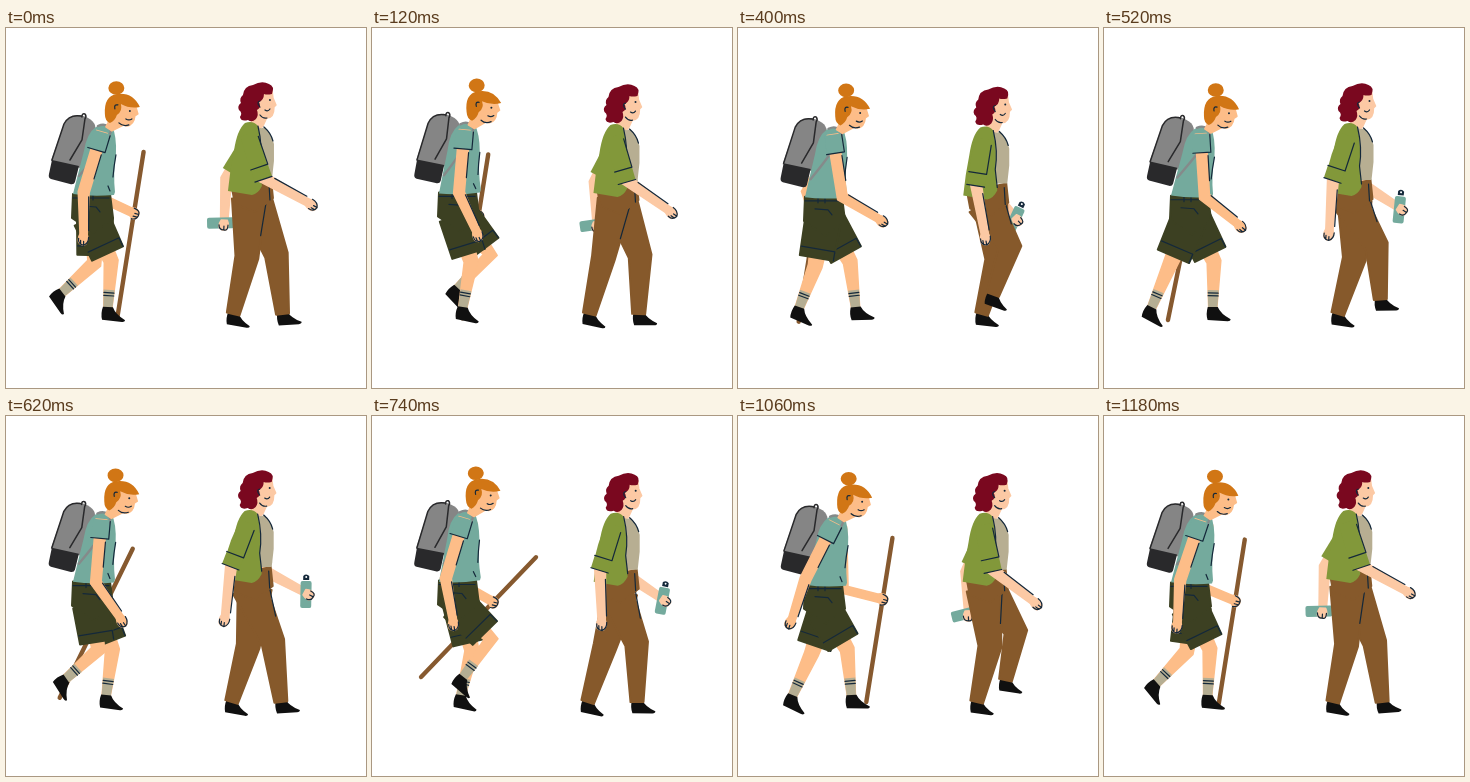
Write an HTML page that moves like this. It is 360 px wide and 360 px high and loops after 1200 ms.

```html
<!DOCTYPE html>
<html lang="en">
<head>
<meta charset="utf-8">
<title>Two walkers</title>
<style>
html, body { margin: 0; width: 100%; height: 100%; overflow: hidden; background: #fff; }
svg { display: block; width: 100vw; height: 100vh; }
path { stroke-linejoin: round; stroke-linecap: round; }
.skin { fill: #fdbd88; stroke: #fdbd88; stroke-width: 1.5; }
.pale { fill: #fcc9a4; stroke: #fcc9a4; stroke-width: 1.5; }
.ink { fill: none; stroke: #14283a; stroke-width: 1.2; }
.teal { fill: #74aa9d; }
.green { fill: #82983a; }
.pants { fill: #86592b; stroke: #86592b; stroke-width: 2; }
.shorts { fill: #3c4022; stroke: #3c4022; stroke-width: 2; }
.shoe { fill: #101010; }
.sock { fill: #b5ae93; }
.stick { fill: none; stroke: #86592f; stroke-width: 4.4; }
.ginger { fill: #d17615; }
.wine { fill: #7a081f; }
.beige { fill: #b7ae92; }
</style>
</head>
<body>
<svg viewBox="0 0 360 360">
  <g id="hiker">
    <path id="hfArm" class="skin"/>
    <path id="stick" class="stick"/>
    <g id="hfHand"><path class="skin" d="M-5-4Q1-7 5-2Q6 4 1 6Q-5 5-5-4Z"/><path class="ink" d="M-1-5Q6-4 5 1Q4 6-1 6M1 0H5M0 3H4"/></g>
    <g id="pack">
      <path fill="#858585" d="M45 133L58 96Q63 87 74 87Q92 92 89 103L74 140Z"/>
      <path fill="#29292b" d="M46 132L73 138L69 154Q68 157 64 156L45 151Q42 150 43 146Z"/>
      <path fill="none" stroke="#29292b" stroke-width="1.5" d="M46 132L58 96Q63 86 75 88M76 89Q76 85 79 86Q81 88 79 91L76 112L64 132"/>
    </g>
    <path id="hfLeg" class="skin"/><path id="hfSock" class="sock"/><path id="hfBand" class="ink"/><path id="hfShoe" class="shoe"/>
    <path id="hfShort" class="shorts"/><path id="hfCuff" class="ink"/>
    <path id="hnLeg" class="skin"/><path id="hnSock" class="sock"/><path id="hnBand" class="ink"/><path id="hnShoe" class="shoe"/>
    <path id="hnShort" class="shorts"/><path id="hnCuff" class="ink"/>
    <g id="waist">
      <path class="shorts" d="M67 166L104 166L107 190L88 205L66 190Z"/>
      <path class="ink" d="M67 170H103M77 178L90 179L94 184M80 167V172M87 167V172"/>
    </g>
    <g id="chest">
      <path class="teal" d="M90 99Q98 95 106 98Q111 108 110 127Q107 145 109 164L108 167Q86 169 67 166Q72 146 78 123Q81 105 90 99Z"/>
      <path fill="none" stroke="#858a8a" stroke-width="2.4" d="M92 98Q101 94 105 103Q103 113 73 148"/>
      <path class="ink" d="M110 127Q108 138 107 149M102 158L104 163"/>
      <path class="skin" d="M100 99L108 84L122 88L118 97L106 103Z"/>
      <path class="skin" d="M112 74L130 79L132 86L129 88Q128 97 121 98Q111 96 109 89Z"/>
      <path class="ginger" d="M99 86Q98 68 111 66Q127 64 134 79Q124 81 115 76Q117 83 111 87Q109 93 104 95Q99 93 99 86Z"/>
      <ellipse class="ginger" cx="110.500" cy="60" rx="8" ry="6.800"/>
      <path class="ink" d="M112 77Q108 76 109 81M120 91Q123 93 126 91M113 95Q117 99 123 97"/>
      <circle cx="124" cy="83" r="1" fill="#14283a"/>
    </g>
    <path id="hnArm" class="skin"/><path id="hnLine" class="ink"/>
    <g id="hnHand"><path class="skin" d="M-4-3Q2-6 7-2Q9 2 5 5Q0 6-4 3Z"/><path class="ink" d="M0-5Q6-5 8 0Q7 6 1 5M4 0L8 0M3 3L7 3"/></g>
    <path id="hSleeve" class="teal"/><path id="hHem" class="ink"/>
  </g>
  <g id="friend">
    <path id="wfArm" class="pale"/><path id="wfSleeve" class="green"/>
    <g id="bottle">
      <rect class="teal" x="-5.500" y="-12" width="11" height="27" rx="2"/>
      <path fill="#14283a" d="M-3-13V-17Q0-20 3-17V-13Z"/><circle cy="-16" r="1" fill="#fff"/>
    </g>
    <g id="wfHand"><path class="pale" d="M-4-3Q2-6 6-2Q7 3 3 5Q-1 5-4 3Z"/><path class="ink" d="M1-4Q7-4 6 0Q6 5 1 5M2 0H6"/></g>
    <path id="wfShoe" class="shoe"/><path id="wfLeg" class="pants"/>
    <path id="wnShoe" class="shoe"/><path id="wnLeg" class="pants"/>
    <path id="crease" class="ink"/>
    <g id="body">
      <path class="pants" d="M226 160L265 151L267 170L249 184L229 176Z"/>
      <path class="ink" d="M263 155L264 172"/>
      <path class="pale" d="M245 96L249 80L262 87L257 98L252 103Z"/>
      <path class="beige" d="M249 97Q254 102 259 99Q266 107 268 116L268 133L266 151H248Z"/>
      <path class="green" d="M239 95Q247 92 252 98Q256 120 254 137L256 158Q252 166 246 167L222 163Q224 142 228 123Q231 102 239 95Z"/>
      <path class="ink" d="M252 98Q257 119 254 137L256 155M258 99Q265 105 267 113"/>
      <path class="pale" d="M251 63L266 62L267 70L270 77L268 79Q268 90 261 90Q252 88 249 80Z"/>
      <path class="wine" d="M247 57Q256 52 263 56Q269 58 266 66Q261 67 258 66Q258 72 253 74Q256 79 251 82Q253 87 250 91Q246 95 242 92Q235 94 234 89Q237 85 233 82Q231 78 235 75Q233 70 237 67Q238 58 247 57Z"/>
      <path class="ink" d="M254 73Q250 74 254 79M259 82Q262 84 264 81M254 87Q257 91 261 90"/>
      <circle cx="264" cy="72" r="1" fill="#14283a"/>
    </g>
    <path id="wnArm" class="pale"/><path id="wnLine" class="ink"/>
    <g id="wnHand"><path class="pale" d="M-4-3Q2-6 7-2Q9 2 5 5Q0 6-4 3Z"/><path class="ink" d="M0-5Q6-5 8 0Q7 6 1 5M4 0L8 0M3 3L7 3"/></g>
    <path id="wSleeve" class="green"/><path id="wCuff" class="green"/><path id="wHem" class="ink"/>
  </g>
</svg>
<script>
const LOOP = 1200, STEP = 20, RAD = Math.PI / 180;
const $ = id => document.getElementById(id);
const draw = (id, d) => $(id).setAttribute('d', d);
const place = (id, p, a = 0, pivot = '') =>
  $(id).setAttribute('transform', `translate(${p[0]} ${p[1]}) rotate(${a} ${pivot})`);
const mix = (a, b, k) => [a[0] + (b[0] - a[0]) * k, a[1] + (b[1] - a[1]) * k];
const shift = (p, n, w) => [p[0] + n[0] * w, p[1] + n[1] * w];
const poly = pts => 'M' + pts.map(p => p.map(v => v.toFixed(2)).join(' ')).join('L');

// Stride runs once per loop, bob once per step
const stride = (t, peak) => Math.cos((t - peak) * 2 * Math.PI / LOOP);
const bob = (t, peak) => stride(2 * t, 2 * peak);
const hang = (p, len, deg) => [p[0] + len * Math.sin(deg * RAD), p[1] + len * Math.cos(deg * RAD)];
const angle = (a, b) => Math.atan2(b[1] - a[1], b[0] - a[0]) / RAD;

// Unit normal on the walking side of a limb
function normal(a, b) {
  const x = b[0] - a[0], y = b[1] - a[1], n = Math.hypot(x, y) || 1;
  return [y / n, -x / n];
}
function limb(pts, widths) {
  const front = [], back = [], last = pts.length - 1;
  pts.forEach((p, i) => {
    const u = normal(pts[Math.max(0, i - 1)], pts[Math.max(1, i)]);
    const v = normal(pts[Math.min(i, last - 1)], pts[Math.min(i + 1, last)]);
    const x = u[0] + v[0], y = u[1] + v[1], m = Math.hypot(x, y) || 1;
    front.push(shift(p, [x / m, y / m], widths[i] / 2));
    back.unshift(shift(p, [x / m, y / m], -widths[i] / 2));
  });
  return poly([...front, ...back]) + 'Z';
}
function edge(a, b, from, to, w) {
  const n = normal(a, b);
  return poly([shift(mix(a, b, from), n, w), shift(mix(a, b, to), n, w)]);
}
function across(a, b, k, w) {
  const n = normal(a, b), p = mix(a, b, k);
  return poly([shift(p, n, w), shift(p, n, -w)]);
}

const SHOE = 'M-5-2L5-2Q8 5 18 10Q18 12 15 12L-5 11Q-7 5-5-2Z';
document.querySelectorAll('.shoe').forEach(s => s.setAttribute('d', SHOE));

const hikerGait = { land: 920, stance: 800, front: 122, back: 47, ground: 281,
  ease: 1.25, lift: 20, skew: .8, push: 26, twist: 70, bend: 28 };
const friendGait = { land: 1170, stance: 790, front: 279, back: 214, ground: 286,
  ease: 1, lift: 22, skew: 2, push: 10, twist: 45, bend: 18 };

// The foot slides back on the ground, then swings forward in an arc
function step(g, t, hip) {
  const s = (t - g.land + 2 * LOOP) % LOOP, reach = g.front - g.back;
  let ankle, turn, bend;
  if (s < g.stance) {
    const u = s / g.stance;
    ankle = [g.front - reach * u ** g.ease, g.ground];
    turn = g.push * u ** 1.5 - 8 * (1 - u) ** 4;
    bend = 12 * Math.sin(Math.PI * (.2 + .8 * u));
  } else {
    const u = (s - g.stance) / (LOOP - g.stance), arc = Math.sin(Math.PI * u);
    ankle = [g.back + reach * u * u * (3 - 2 * u),
      g.ground - g.lift * Math.sin(Math.PI * u ** g.skew)];
    turn = g.push * (1 - u) - 8 * u + g.twist * arc * (1 - u);
    bend = 7 * u + g.bend * arc;
  }
  const knee = shift(mix(hip, ankle, .5), normal(hip, ankle), bend);
  return { knee, ankle, turn };
}

function bareLeg(id, hip, t) {
  const { knee, ankle, turn } = step(hikerGait, t, hip), end = mix(hip, knee, .82);
  draw(id + 'Leg', limb([hip, knee, ankle], [20, 14, 8]));
  draw(id + 'Sock', limb([mix(knee, ankle, .6), ankle], [11, 9]));
  draw(id + 'Band', across(knee, ankle, .66, 5) + across(knee, ankle, .72, 5));
  place(id + 'Shoe', ankle, turn);
  draw(id + 'Short', limb([hip, end], [36, 34]));
  draw(id + 'Cuff', across(hip, end, .76, 17) + edge(hip, end, .76, 1, 17));
}
function pantLeg(id, hip, t) {
  const { knee, ankle, turn } = step(friendGait, t, hip);
  draw(id + 'Leg', limb([hip, knee, ankle], [34, 23, 13]));
  place(id + 'Shoe', ankle, turn);
  return knee;
}

function hiker(t) {
  const lean = 2.6 * (bob(t, 525) - .74), dy = 2.2 * (bob(t, 420) + .3);
  const joint = (x, y) => [x - (y - 167) * lean * RAD, y + (x - 88) * lean * RAD + dy];
  place('chest', [0, dy], lean, '88 167');
  place('pack', [0, dy], lean / 2, '88 167');
  place('waist', [0, dy]);

  const reach = stride(t, 990), grip = [112 + 35 * reach, 187 - 4 * reach];
  const tilt = 9 + 35 * Math.exp(-(((t - 730) / 130) ** 2));
  const far = joint(103, 108);
  draw('hfArm', limb([far, hang(far, 63, 18 * reach - 14), grip], [11, 10, 8]));
  draw('stick', poly([hang(grip, -62, -tilt), hang(grip, 104, -tilt)]));
  place('hfHand', grip, 15);

  bareLeg('hf', [89, 190 + dy], t + 600);
  bareLeg('hn', [85, 190 + dy], t);

  const s = joint(96, 104);
  const e = hang(s, 63, 19 * stride(t, 370) - 10);
  const h = hang(e, 45, 19 + 40 * stride(t, 395));
  draw('hnArm', limb([s, e, h], [11, 11, 7]));
  draw('hnLine', edge(e, h, .1, .85, 5) + edge(s, e, .35, .75, 6));
  place('hnHand', h, angle(e, h));
  draw('hSleeve', limb([s, mix(s, e, .3)], [16, 18]));
  draw('hHem', across(s, e, .3, 9) + edge(s, e, .02, .3, 9));
}

function friend(t) {
  const dx = 1.3 + 2 * bob(t, 380), dy = 3 - 3 * bob(t, 0);
  place('body', [dx, dy]);

  const c = stride(t, 610), grip = [260 + 42 * c, 198 - 9 * c - 11 * c * c];
  const far = [246 + dx, 108 + dy], bent = hang(far, 50, 24 * c - 7);
  draw('wfArm', limb([far, bent, grip], [12, 11, 7]));
  draw('wfSleeve', limb([far, mix(far, bent, .85)], [16, 17]));
  place('bottle', [grip[0] - 2, grip[1] - 1], 45 - 44 * c);
  place('wfHand', grip, angle(bent, grip));

  pantLeg('wf', [249 + dx, 172 + dy], t);
  const hip = [243 + dx, 171 + dy], knee = pantLeg('wn', hip, t + 600);
  draw('crease', poly([[262 + dx, 163 + dy], shift(mix(hip, knee, .62), normal(hip, knee), 13)]));

  const s = [242 + dx, 106 + dy];
  const e = hang(s, 46, 1 + 20 * stride(t, 20) - 2);
  const h = hang(e, 54, 27 + 34 * stride(t, 0));
  draw('wnArm', limb([mix(s, e, .8), e, h], [10, 11, 7]));
  draw('wnLine', edge(e, h, .2, .88, 5));
  place('wnHand', h, angle(e, h));
  draw('wSleeve', limb([s, mix(s, e, .5), e], [16, 18, 16]));
  draw('wCuff', limb([mix(s, e, .76), mix(s, e, 1.04)], [18, 18]));
  draw('wHem', across(s, e, .76, 9) + across(s, e, 1.04, 9) + edge(s, e, .12, .76, 9));
}

function tick() {
  const t = Math.floor(performance.now() / STEP) * STEP % LOOP;
  hiker(t);
  friend(t);
  requestAnimationFrame(tick);
}
tick();
</script>
</body>
</html>
```
